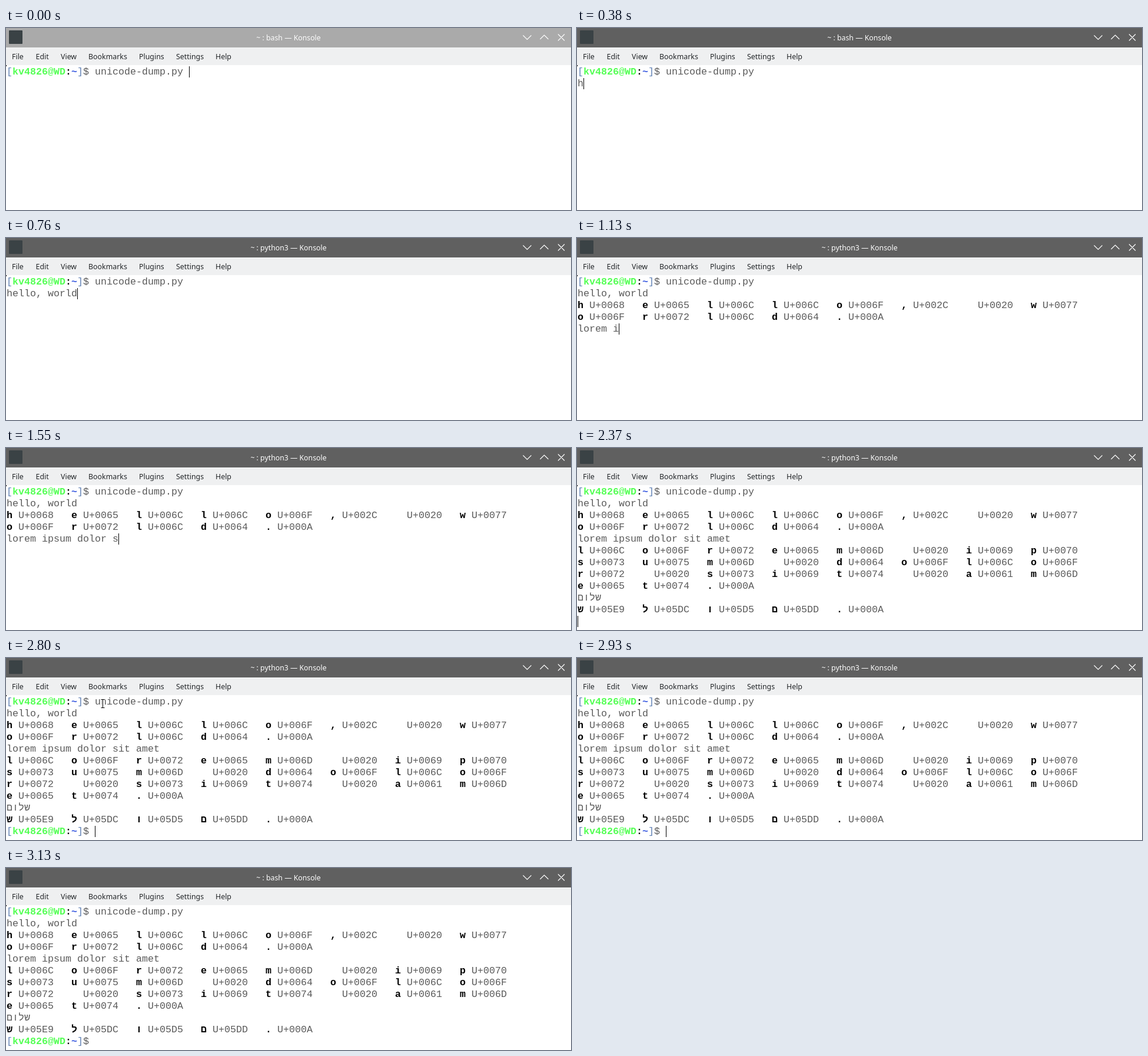
An HTML page that plays this animation: 960 by 309 pixels, repeating every 3230 ms.

```html
<!DOCTYPE html>
<html lang="en">
<head>
<meta charset="utf-8">
<title>Terminal session</title>
<style>
  html, body { margin: 0; width: 100%; height: 100%; overflow: hidden; background: #fff; }
  svg { display: block; width: 960px; height: 309px; }
  text { white-space: pre; }
  .ui { font-family: "Noto Sans", sans-serif; font-size: 12.4px; fill: #232629; }
  .title { font-size: 12.3px; fill: #fcfcfc; text-anchor: middle; }
  .term { font-family: "Liberation Mono", monospace; font-size: 16.66px; fill: #5a5a5a; }
  .b { font-weight: bold; fill: #000; }
  .user { font-weight: bold; fill: #54ff54; }
  .path { font-weight: bold; fill: #3c5ce0; }
  .bracket { fill: #5f80b4; }
</style>
</head>
<body>
<svg id="stage" viewBox="0 0 960 309" xmlns="http://www.w3.org/2000/svg">
  <rect width="960" height="309" fill="#fff"/>
  <rect id="bar" width="960" height="33"/>
  <rect x="5" y="4" width="23" height="23" rx="1" fill="#3a4245"/>
  <text id="title" class="ui title" x="480" y="21"></text>
  <path d="M878.5 12.5l7 7 7-7M907.5 19l7-7 7 7M938 10.5l11 11M949 10.5l-11 11"
        fill="none" stroke="#fcfcfc" stroke-width="1.2"/>
  <rect y="33" width="960" height="30" fill="#eff0f1"/>
  <g id="menu" class="ui"></g>
  <rect y="63" width="1" height="2" fill="#000"/>
  <g id="term" class="term"></g>
  <rect id="caret" width="1" height="19" fill="#000"/>
  <g id="pointer" fill="none">
    <path d="M-2.5 -7H3.5M-2.5 7H3.5M.5 -7V7" stroke="#fff" stroke-width="3"/>
    <path d="M-2.5 -7H3.5M-2.5 7H3.5M.5 -7V7" stroke="#000"/>
  </g>
</svg>
<script>
const LOOP = 3230, CELL = 10, ROW = 20, PER_ROW = 8;
const ENTER = 290, PROMPT = 2560, CARET_OFF = 3000;
const TITLE_RUN = 470, TITLE_BACK = 2940;
const FADE = [30, 200], GRAY = [170, 96];

// each input line: row, text, first key, time per key, time of its output
const inputs = [
  { row: 1, text: "hello, world", start: 375, gap: 32, out: 775 },
  { row: 4, text: "lorem ipsum dolor sit amet", start: 932, gap: 32.67, out: 1790 },
  { row: 9, text: "שלום", start: 2010, gap: 60, out: 2300 }
];
// pointer path: time, x, y
const path = [[2600, 260, 250], [2700, 205, 129], [2795, 164, 77],
              [2830, 164, 77], [2900, 40, 71]];

const $ = id => document.getElementById(id);
const clamp = (v, lo, hi) => Math.min(hi, Math.max(lo, v));
const mix = (a, b, k) => a + (b - a) * k;
const show = (el, on) => el.setAttribute("visibility", on ? "visible" : "hidden");

function add(parent, tag, attrs, text = "") {
  const el = document.createElementNS("http://www.w3.org/2000/svg", tag);
  for (const k in attrs) el.setAttribute(k, attrs[k]);
  el.textContent = text;
  return parent.appendChild(el);
}
function put(parent, row, col, text, cls = "") {
  return add(parent, "text", { x: 1 + col * CELL, y: 79 + row * ROW, class: cls }, text);
}
function prompt(parent, row, command) {
  const line = put(parent, row, 0, "");
  const parts = [["[", "bracket"], ["kv4826@WD", "user"], [":", "b"],
                 ["~", "path"], ["]", "bracket"], ["$ " + command, ""]];
  for (const [text, cls] of parts) add(line, "tspan", { class: cls }, text);
  return line;
}
function dump(parent, row, text) {
  const g = add(parent, "g", {});
  [...text, "\n"].forEach((ch, i) => {
    const r = row + Math.floor(i / PER_ROW), c = i % PER_ROW * 11;
    const hex = ch.codePointAt(0).toString(16).toUpperCase().padStart(4, "0");
    put(g, r, c, ch === "\n" ? "." : ch, "b");
    put(g, r, c + 2, "U+" + hex);
  });
  return g;
}

const menu = [["File", 10], ["Edit", 50.5], ["View", 93], ["Bookmarks", 140],
              ["Plugins", 226], ["Settings", 289], ["Help", 356]];
for (const [label, x] of menu) add($("menu"), "text", { x, y: 53 }, label);

const term = $("term");
prompt(term, 0, "unicode-dump.py");
for (const line of inputs) {
  line.el = put(term, line.row, 0, "");
  line.dump = dump(term, line.row + 1, line.text);
  line.next = line.row + 1 + Math.ceil((line.text.length + 1) / PER_ROW);
}
const lastPrompt = prompt(term, 11, "");

function setText(el, text) {
  if (el.textContent !== text) el.textContent = text;
}

function drawPointer(t) {
  const i = path.findIndex(p => p[0] > t);
  show($("pointer"), i > 0);
  if (i < 1) return;
  const [t0, x0, y0] = path[i - 1], [t1, x1, y1] = path[i];
  const k = (t - t0) / (t1 - t0);
  $("pointer").setAttribute("transform",
    `translate(${Math.round(mix(x0, x1, k))} ${Math.round(mix(y0, y1, k)) + 0.5})`);
}

function draw(t) {
  const k = clamp((t - FADE[0]) / (FADE[1] - FADE[0]), 0, 1);
  const gray = Math.round(mix(...GRAY, k));
  $("bar").setAttribute("fill", `rgb(${gray},${gray},${gray})`);
  const job = t >= TITLE_RUN && t < TITLE_BACK ? "python3" : "bash";
  setText($("title"), `~ : ${job} — Konsole`);

  let row = 0, col = 31;
  if (t >= ENTER) { row = 1; col = 0; }
  for (const line of inputs) {
    const n = clamp(Math.floor((t - line.start) / line.gap) + 1, 0, line.text.length);
    setText(line.el, line.text.slice(0, n));
    show(line.dump, t >= line.out);
    if (n) { row = line.row; col = n; }
    if (t >= line.out) { row = line.next; col = 0; }
  }
  if (t >= PROMPT) col = 15;
  show(lastPrompt, t >= PROMPT);

  const caret = $("caret");
  caret.setAttribute("x", 1 + col * CELL);
  caret.setAttribute("y", 65 + row * ROW);
  show(caret, t < CARET_OFF);
  drawPointer(t);
}

function tick() {
  draw(performance.now() % LOOP);
  requestAnimationFrame(tick);
}
tick();
</script>
</body>
</html>
```
